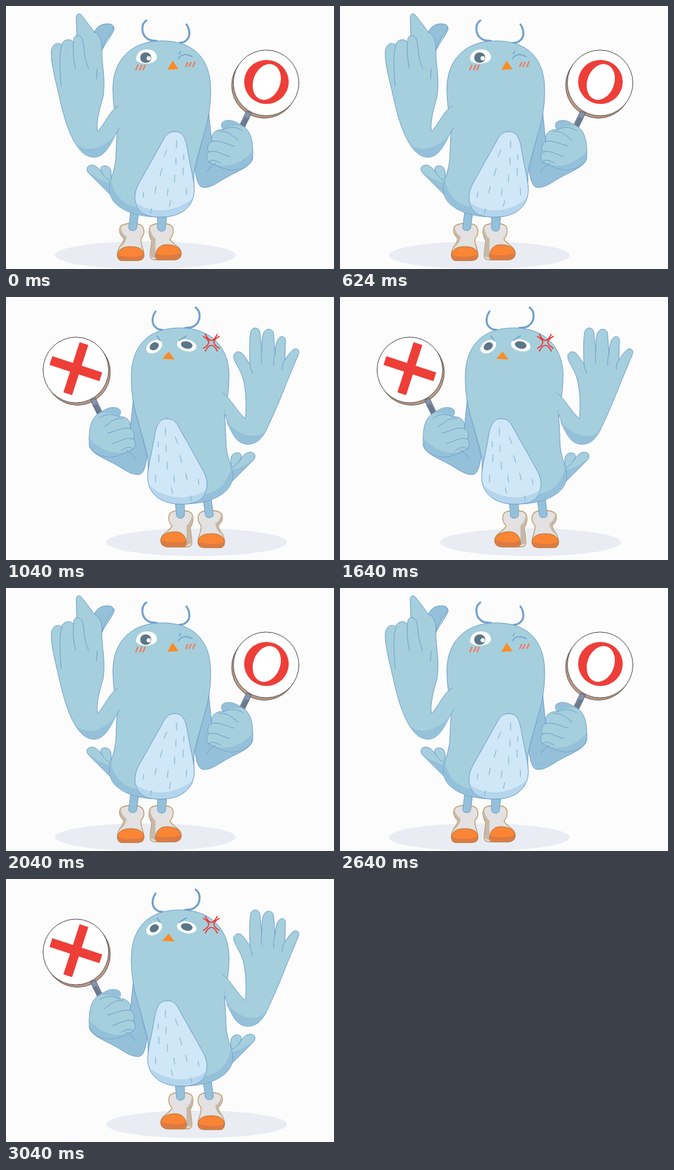
Recreate the animation shown at these times as an HTML page. Size 500 by 400 pixels, loop 4000 ms.

```html
<!DOCTYPE html>
<html lang="en">
<head>
<meta charset="utf-8">
<title>Bird with a sign</title>
<style>
  html, body { margin: 0; width: 100%; height: 100%; overflow: hidden; background: #fcfcfc; }
  svg { display: block; width: 100vw; height: 100vh; }
  path, ellipse, circle { stroke-linecap: round; stroke-linejoin: round; }
  .skin { fill: #a5cfdc; stroke: #709fcd; }
  .dark { fill: #94c1d9; stroke: #709fcd; }
  .shade { fill: #94c1d9; }
  .line { fill: none; stroke: #709fcd; }
  .boot { fill: #e3e1e1; stroke: #bd9c68; stroke-width: 1.3; }
  .side { fill: #c6b8aa; }
  .rim { fill: #c09a86; stroke: #5e5751; }
  .toe { fill: #fa8535; stroke: #ae763f; }
  .sole { fill: #dd7a43; }
  .beak { fill: #fb8b24; }
  .pupil { fill: #5b7589; }
  .red { fill: #ee3e38; }
</style>
</head>
<body>
<svg viewBox="0 0 500 400">
  <defs>
    <g id="bird">
      <ellipse cx="212.5" cy="379" rx="138" ry="21" fill="#e9ecf3"/>

      <!-- antennae -->
      <path class="line" stroke-width="3" d="M214 22C206 27 205 43 216 50C220 53 225 53 230 53M275 28C280 35 282 46 275 52C272 55 268 56 264 56"/>

      <!-- tail -->
      <path class="skin" d="M164 292L125 253C121 246 125 242 131 242C138 242 143 249 147 255C142 248 144 243 151 243C160 244 161 250 160 262L170 280Z"/>
      <path class="shade" d="M163 291L126 253Q143 266 161 270Z"/>
      <path class="line" d="M147 255C151 261 155 264 158 265"/>

      <!-- boots -->
      <path class="boot" d="M175 335C181 329 202 330 207 334C212 340 211 348 206 353C204 363 211 369 210 380Q209 387 201 387H176Q169 386 170 377C170 365 181 361 179 353C172 347 172 339 175 335Z"/>
      <path class="boot" d="M220 335C226 329 247 330 252 334C257 339 255 349 250 354C252 362 267 365 267 376Q267 385 257 386H228Q220 386 220 381C219 372 222 364 222 357C217 349 217 340 220 335Z"/>
      <path class="side" d="M175 336Q176 346 184 351Q183 361 173 368Q180 360 179 353Q172 347 175 336ZM220 337Q221 349 228 354Q227 368 229 384L221 381Q220 371 223 357Q217 350 220 337Z"/>
      <path class="toe" d="M170 378C172 368 181 366 190 366C201 366 208 369 210 376Q212 387 201 387H177Q170 387 170 378Z"/>
      <path class="sole" d="M171 379Q190 385 210 378Q210 386 201 386H177Q171 386 171 379Z"/>
      <path class="toe" d="M228 379C229 369 235 363 245 363C257 363 267 368 267 377Q267 385 257 386H235Q227 387 228 379Z"/>
      <path class="sole" d="M229 377Q246 382 266 376Q267 385 257 385H235Q228 386 229 377Z"/>

      <!-- legs -->
      <path class="dark" d="M190 314L187 337C187 343 198 343 199 338L202 316ZM231 318V338C232 344 243 344 243 338L245 318Z"/>

      <!-- arm holding the sign -->
      <path class="dark" d="M309 162L314 211L325 235L376 228C378 242 356 250 341 258C324 267 314 276 303 276C293 277 291 265 288 250Z"/>

      <!-- body -->
      <path class="skin" d="M163 125C163 86 187 53 238 53C286 53 312 80 312 128C312 147 310 162 306 180L289 240C284 260 288 270 286 286C283 310 262 321 235 321C211 321 185 316 170 303C157 293 155 277 160 263C167 244 168 232 168 215L170 180C165 160 163 145 163 125Z"/>
      <path class="shade" d="M160 264C164 286 178 305 205 306L236 320C211 320 185 315 170 302C158 292 156 278 160 264Z"/>

      <!-- belly -->
      <path d="M257 191C248 191 243 197 239 205L203 269C197 280 195 290 198 300C202 316 217 321 235 321C263 321 284 309 287 283C288 268 281 245 277 220C274 203 271 191 257 191Z" fill="#d0e7f7" stroke="#709fcd"/>
      <path d="M198 299C216 314 256 317 284 293C278 312 257 320 235 320C214 320 202 314 198 299Z" fill="#b5d5ec"/>
      <path fill="none" stroke="#79b1ca" d="M260 205v11M245 219l-4 10M271 226v8M259 231v10M238 247l-3 11M257 257v11M270 246v11M229 274l-2 10M247 278l-1 10M275 277v10M251 296l-2 9M222 308l-2 8M210 283l-1 8"/>

      <!-- sign -->
      <circle class="rim" cx="394" cy="120.5" r="50"/>
      <circle cx="396.5" cy="117" r="50" fill="#fff" stroke="#4c4a49"/>
      <path d="M367 160L374 163L361 190L354 187Z" fill="#8293ab" stroke="#4f5d70"/>
      <path d="M364 169L371 171L361 190L354 187Z" fill="#6c7a8e"/>

      <!-- gripping hand -->
      <path class="skin" d="M331 188C325 180 329 174 340 174C347 174 353 178 360 182C370 187 376 200 376 218C378 236 370 246 349 249C335 251 318 242 309 237C304 231 306 225 309 222C305 215 309 208 314 206C311 195 319 187 331 188Z"/>
      <path class="shade" d="M310 237C327 247 352 246 375 222C377 237 369 245 349 248C335 250 319 242 310 237Z"/>
      <path class="shade" d="M331 188C325 180 329 175 340 175C347 175 353 179 359 183Q345 180 331 188Z"/>
      <path class="line" d="M331 188C344 182 354 185 361 190M325 191C339 189 345 198 354 204M314 206C325 203 337 211 348 213M309 222C320 218 329 226 341 229M309 237C315 232 321 236 327 239M320 239Q311 243 306 252"/>
    </g>

    <!-- underside of the raised arm -->
    <path id="elbow" class="shade" d="M107 210C121 222 147 220 168 194C159 214 151 229 135 229C122 229 113 222 107 210Z"/>
  </defs>

  <g id="yes">
    <use href="#bird"/>
    <ellipse class="red" cx="397" cy="115.5" rx="34" ry="33.5"/>
    <ellipse cx="397.5" cy="115.5" rx="20.5" ry="28" fill="#fff" transform="rotate(20 397.5 115.5)"/>

    <path class="skin" d="M171 152C160 157 151 178 140 191C136 180 143 155 148 138C152 110 146 90 146 68C150 58 164 42 165 34C164 27 153 26 146 29C141 31 138 35 135 40L116 15C112 10 108 11 107 17L108 45C103 46 103 52 103 55C99 49 87 50 85 59C78 54 70 58 69 70C68 88 78 122 83 146C91 180 99 199 107 211C115 224 124 230 135 230C153 229 160 207 173 185"/>
    <path class="dark" d="M135 40C138 29 151 25 161 28C167 32 160 41 155 47Q150 54 146 68C147 54 143 42 135 40Z"/>
    <path class="line" d="M85 59C81 72 82 96 84 122M103 55C101 70 104 85 106 95M108 45C118 45 117 53 119 66Q120 82 126 95M139 96L138 111"/>
    <use href="#elbow"/>

    <path d="M198 81C199 71 206 66 215 66C225 66 231 72 230 80C225 90 202 90 198 81Z" fill="#fff"/>
    <ellipse class="pupil" cx="213" cy="78.5" rx="8.5" ry="8"/>
    <circle cx="217.5" cy="79.5" r="3.2" fill="#fff"/>
    <path class="line" stroke-width="1.5" d="M263 80C268 72 277 73 284 77M266 69L264 73"/>
    <path fill="none" stroke="#f4775c" stroke-width="2" d="M201 90l-3 7M207 90l-3 7M212 90l-3 7M277 86l-3 6M282 86l-3 6M288 85l-3 7"/>
    <path class="beak" d="M254 83L246 97L263 96Z"/>
  </g>

  <g id="no">
    <use href="#bird" transform="matrix(-1 0 0 1 503 -6)"/>
    <path class="red" transform="translate(106.5 109) rotate(18)" d="M-7-40H7V-7H40V7H7V40H-7V7H-40V-7H-7Z"/>

    <path class="skin" d="M331 146C343 155 352 174 365 185C367 165 366 140 361 123C357 109 347 99 347 89C350 81 358 82 362 88L372 102C371 85 371 65 373 53C375 45 386 45 387 54L390 83C390 70 390 61 393 54C397 46 408 48 408 57L410 86C411 75 412 67 416 63C421 57 427 61 426 69L425 96C430 88 435 81 440 79C446 78 448 83 445 89C439 104 431 122 424 140C414 165 405 185 396 204C388 219 379 224 368 224C350 223 343 206 334 179"/>
    <path class="line" d="M372 102Q373 110 376 116M390 83Q388 94 390 100M410 86Q407 96 408 104M425 96Q421 101 421 110"/>
    <use href="#elbow" transform="matrix(-1 0 0 1 503 -6)"/>

    <ellipse cx="226" cy="75.5" rx="13" ry="9" fill="#fff" transform="rotate(-32 226 75.5)"/>
    <ellipse class="pupil" cx="226" cy="75" rx="7.5" ry="5.5" transform="rotate(-32 226 75)"/>
    <ellipse cx="275.5" cy="73.5" rx="15" ry="9" fill="#fff" transform="rotate(12 275.5 73.5)"/>
    <ellipse class="pupil" cx="275.5" cy="73" rx="9" ry="5.5" transform="rotate(12 275.5 73)"/>
    <path class="line" stroke-width="1.5" d="M230 59L235 66M264 66L275 59"/>
    <path fill="none" stroke="#ee3432" stroke-width="1.7" d="M304 57Q313 75 322 57M304 82Q313 65 322 82M301 60Q317 69 301 78M325 60Q309 69 325 78"/>
    <path class="beak" d="M248 83L238 94L257 95Z"/>
  </g>
</svg>
<script>
  const LOOP = 4000;
  const yes = document.getElementById('yes');
  const no = document.getElementById('no');

  function draw(now) {
    const t = now % LOOP;
    const agrees = t < 1040 || (t >= 2040 && t < 3040);
    yes.style.display = agrees ? '' : 'none';
    no.style.display = agrees ? 'none' : '';
  }

  const start = performance.now();
  function tick() {
    draw(performance.now() - start);
    requestAnimationFrame(tick);
  }
  tick();
</script>
</body>
</html>
```
